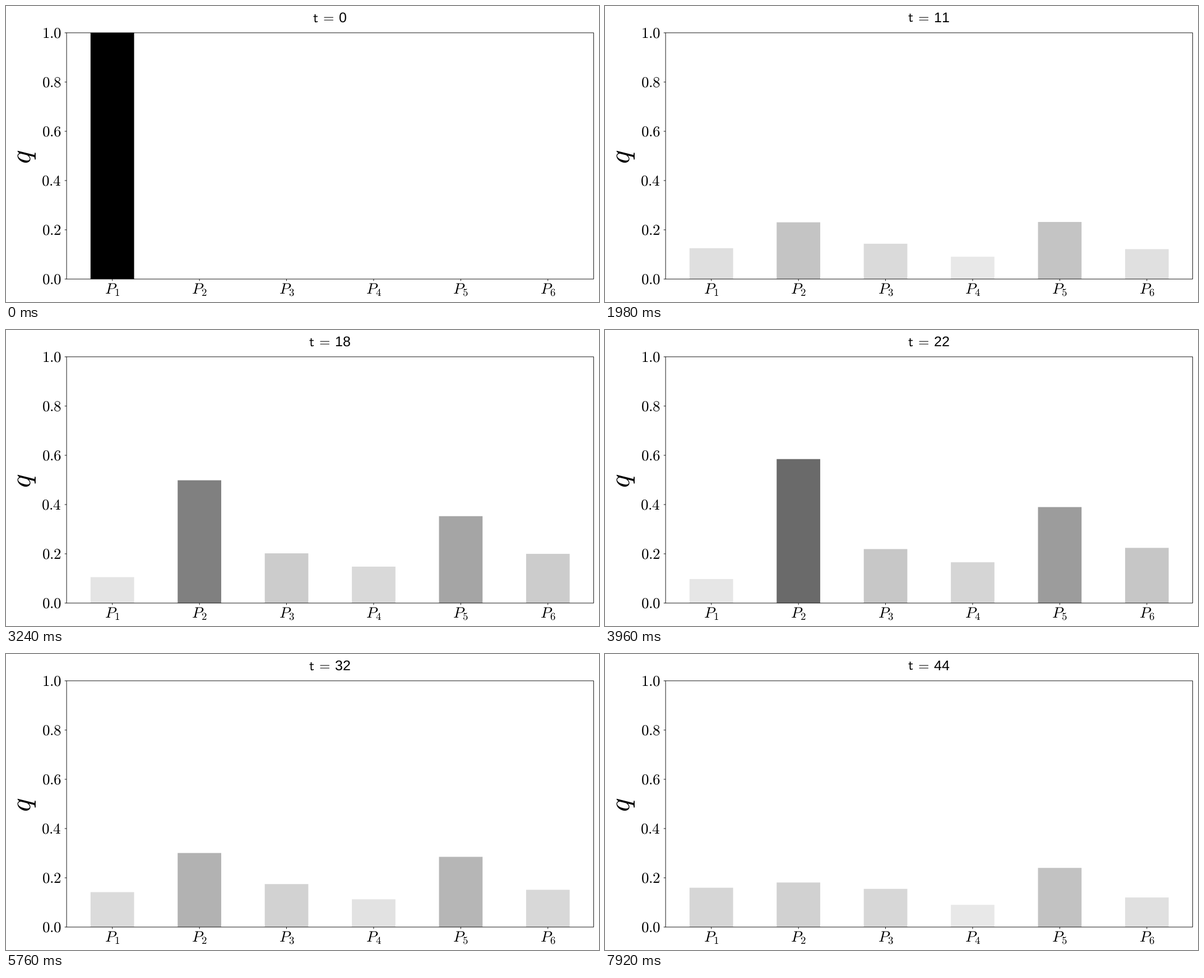
Animation, 1058 px wide and 529 px high, one loop 8 s. Source, as a matplotlib script:

```python
import numpy as np
import matplotlib.pyplot as plt
from matplotlib.animation import FuncAnimation
from matplotlib.patches import Rectangle

W, H, DPI = 1058, 529, 100
LOOP_MS, TICK_MS, STEP_MS = 8000, 20, 180
LEFT, RIGHT, TOP, BOTTOM = 108.1, 1048.4, 47.9, 488.0
PT = 72 / DPI
TEXT, TITLE, LABEL = 27 * PT, 25 * PT, 51 * PT

plt.rcParams.update({"mathtext.fontset": "cm", "text.hinting": "none"})

# Each bar settles at a rest level and swells (or shrinks) around t = PEAK_T.
REST = np.array([0.16, 0.18, 0.155, 0.09, 0.24, 0.12])
SWELL = np.array([-0.06, 0.42, 0.07, 0.08, 0.16, 0.11])
PEAK_T, PEAK_W = 22, 9
RISE, FALL = 6, 1.8
EMPTY_AT = {3: 7, 0: 38}  # bar index -> time at which it runs empty

N = len(REST)
UNIT = (RIGHT - LEFT) / (1.1 * (N - 0.5))
BAR_W = 0.5 * UNIT
CENTERS = LEFT + UNIT * (0.525 + np.arange(N))


def bell(t, mid, width):
    return np.exp(-((t - mid) / width) ** 2)


def heights(t):
    q = (REST + SWELL * bell(t, PEAK_T, PEAK_W)) * (1 - np.exp(-t / RISE))
    q[0] += np.exp(-t / FALL)
    for i, t0 in EMPTY_AT.items():
        q[i] *= 1 - bell(t, t0, 1.5)
    return np.clip(q, 0, 1)


def y_of(q):
    return BOTTOM - q * (BOTTOM - TOP)


fig = plt.figure(figsize=(W / DPI, H / DPI), dpi=DPI, facecolor="white")
ax = fig.add_axes([0, 0, 1, 1])
ax.set(xlim=(0, W), ylim=(H, 0))
ax.axis("off")


def line(xs, ys):
    ax.plot(xs, ys, color="black", lw=0.9 * PT, solid_capstyle="butt", snap=False)


def label(x, y, s, size=TEXT, ha="center", **kw):
    return ax.text(x, y, s, fontsize=size, ha=ha, va="baseline", **kw)


bars = [ax.add_patch(Rectangle((c - BAR_W / 2, BOTTOM), BAR_W, 0, lw=0, snap=False))
        for c in CENTERS]

ax.add_patch(Rectangle((LEFT, TOP), RIGHT - LEFT, BOTTOM - TOP, fill=False,
                       ec="black", lw=0.9 * PT, snap=False, zorder=3))
for v in np.linspace(0, 1, 6):
    line([LEFT - 3.4, LEFT], [y_of(v)] * 2)
    label(99, y_of(v) + 9.3, f"${v:.1f}$", ha="right")
for i, c in enumerate(CENTERS):
    line([c, c], [BOTTOM, BOTTOM + 3.4])
    label(c, 514, f"$P_{i + 1}$")
label(44, 269, "$q$", LABEL, rotation=90, rotation_mode="anchor")
title = label(578, 29, "", TITLE, fontname="Liberation Sans")


def update(i):
    t = i * TICK_MS // STEP_MS
    title.set_text(rf"$\mathsf{{t}}\hspace{{0.22}}=\hspace{{0.22}}${t}")
    for bar, q in zip(bars, heights(t)):
        bar.set_y(y_of(q))
        bar.set_height(BOTTOM - y_of(q))
        bar.set_facecolor(str(1 - q))
    return [title, *bars]


anim = FuncAnimation(fig, update, frames=LOOP_MS // TICK_MS, interval=TICK_MS,
                     repeat=True, repeat_delay=0, blit=False)
plt.show()
```
